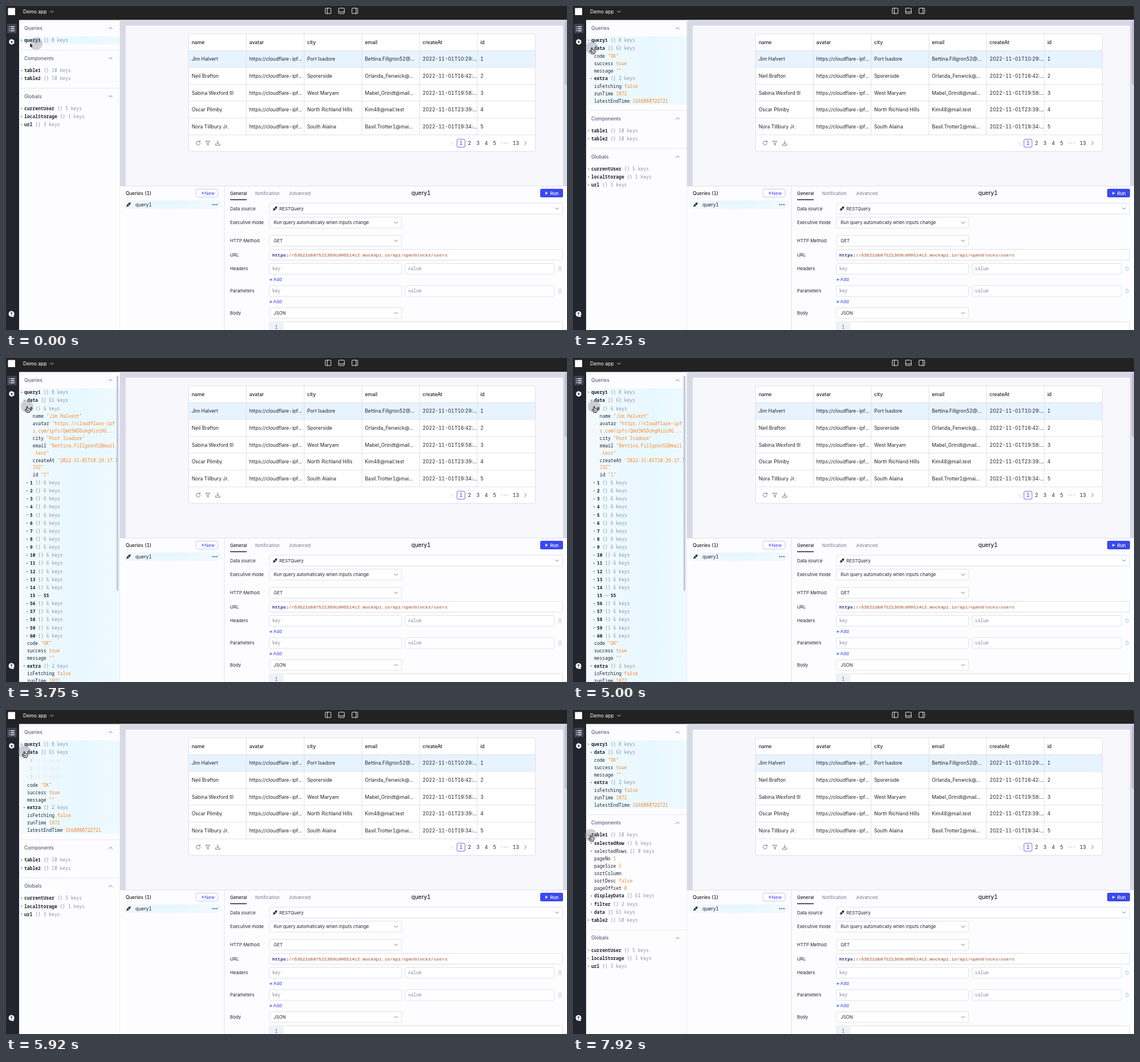
Write an HTML page that moves like this. It is 984 px wide and 569 px high and loops after 8 s.

```html
<!DOCTYPE html>
<html lang="en">
<head>
<meta charset="utf-8">
<title>Query data browser</title>
<style>
  html, body { margin: 0; width: 100%; height: 100%; overflow: hidden; background: #fff; }
  svg { display: block; }
  text { font-family: Inter, sans-serif; font-variant-numeric: tabular-nums; white-space: pre; }
  .mono { font-family: "Noto Sans Mono", "DejaVu Sans Mono", monospace; font-size: 8.02px; }
  .code { font-family: "Liberation Mono", monospace; font-size: 8px; }
</style>
</head>
<body>
<svg id="stage" width="984" height="569" viewBox="0 0 984 569"></svg>
<script>
const LOOP = 8000, STEP = 1000 / 12;
const INK = '#222230', MUTED = '#8b8fa5', BLUE = '#3b49f0', EDGE = '#d6d8e8', VALUE = '#fb8426';
const stage = document.getElementById('stage');

// ---------- drawing helpers ----------
const rect = (x, y, w, h, fill, extra = '') =>
  `<rect x="${x}" y="${y}" width="${w}" height="${h}" fill="${fill}" ${extra}/>`;
const box = (x, y, w, h, stroke = EDGE, fill = '#fff', r = 2) =>
  rect(x, y, w, h, fill, `rx="${r}" stroke="${stroke}" stroke-width=".8"`);
const path = (d, stroke = INK, w = 1, fill = 'none') =>
  `<path d="${d}" stroke="${stroke}" stroke-width="${w}" fill="${fill}" stroke-linecap="round" stroke-linejoin="round"/>`;
const text = (x, cy, s, { size = 7.9, fill = INK, weight = 400, anchor = 'start', cls = '' } = {}) =>
  `<text x="${x}" y="${cy + size * .36}" font-size="${size}" fill="${fill}" font-weight="${weight}" text-anchor="${anchor}" class="${cls}">${s}</text>`;
const chevron = (x, y, up, color = '#6d7088') => {
  const k = up ? -1 : 1;
  return path(`M${x - 2.8} ${y - 1.4 * k}l2.8 ${2.8 * k} 2.8 ${-2.8 * k}`, color);
};
const dots = (x, y, gap, r, color) =>
  [-1, 0, 1].map(i => `<circle cx="${x + i * gap}" cy="${y}" r="${r}" fill="${color}"/>`).join('');
const plug = (x, y) => `<g transform="translate(${x} ${y}) rotate(45)">` +
  rect(-1.9, -3.6, 3.8, 3.2, INK, 'rx="1"') + rect(-1.9, .3, 3.8, 3, INK, 'rx="1"') +
  path('M0 -5V-3M0 3V5') + '</g>';
const trash = (x, y) => path(`M${x - 3} ${y - 2.4}h6M${x - 2.4} ${y - 2}v5h4.8v-5M${x - 1} ${y - 3.4}h2M${x - 1} ${y + .5}h2`, '#c3c5d4', .8);
const gradient = (id, ...stops) => `<linearGradient id="${id}">` +
  stops.map((c, i) => `<stop offset="${i / (stops.length - 1)}" stop-color="${c}"/>`).join('') + '</linearGradient>';

// ---------- fixed parts ----------
function frame() {
  let s = rect(0, 0, 984, 569, '#fdfdff') + rect(0, 0, 23, 569, '#23252e') + rect(0, 0, 984, 24.5, '#222222');
  s += rect(3.5, 3.5, 12.5, 12.5, '#fff');
  s += text(30, 9.8, 'Demo app', { size: 8.6, fill: '#fff' }) + chevron(80.5, 10, false, '#ddd');
  ['M563.6 3.8v9.4', 'M583.6 10.2h10', 'M613.9 3.8v9.4'].forEach((d, i) => {
    s += rect(560 + i * 23.4, 3.8, 10, 9.4, 'none', 'rx="1.2" stroke="#e8e8ec"') + path(d, '#e8e8ec');
  });
  s += rect(2, 31.5, 16.5, 16.5, '#40434f', 'rx="2"');
  for (const y of [36.5, 40, 43.5])
    s += path(`M5.8 ${y}h.4M8.6 ${y}h6`, '#fff', 1.3);
  s += path('M10 58.6l4 2.2v4.6l-4 2.2-4-2.2v-4.6z', '#fff', 1, '#fff') + `<circle cx="10" cy="63.1" r="1.7" fill="#23252e"/>`;
  s += `<circle cx="9.6" cy="540.8" r="5" fill="#fff"/>` + path('M12 543l2 2.6h-4z', '#fff', .6, '#fff');
  s += text(9.6, 540.8, '?', { size: 8, weight: 700, anchor: 'middle', fill: '#23252e' });
  return s;
}

function table() {
  const cols = [320.5, 421.5, 523, 624.3, 725.5, 826.7];
  const rows = [
    ['name', 'avatar', 'city', 'email', 'createAt', 'id'],
    ['Jim Halvert', '', 'Port Isadore', 'Bettina.Fillgron52@...', '10:29', 1],
    ['Neil Brafton', '', 'Sporerside', 'Orlanda_Fenwick@...', '16:42', 2],
    ['Sabina Wexford III', '', 'West Maryam', 'Mabel_Grindt@mail...', '19:58', 3],
    ['Oscar Plimby', '', 'North Richland Hills', 'Kim48@mail.test', '23:39', 4],
    ['Nora Tillbury Jr.', '', 'South Alaina', 'Basil.Trotter1@mai...', '19:34', 5]
  ];
  let s = rect(200, 24.5, 784, 291.5, '#d9d9e6') + rect(210, 34.5, 767, 281.5, '#f7f7fc');
  s += rect(980, 27, 4, 111, '#bfc0cf', 'rx="1.5"');
  s += box(320.5, 49, 608, 206.3, '#d8d9ea') + rect(321, 78.5, 607, 29, '#e7f4fe');
  rows.forEach((row, r) => {
    const y = 63.8 + r * 29.56;
    s += path(`M320.5 ${y + 14.7}H928.5`, '#d8d9ea', .8);
    row.forEach((cell, c) => {
      if (r && c === 1) cell = 'https://cloudflare-ipf...';
      if (r && c === 4) cell = `2022-11-01T${cell}:...`;
      s += text(cols[c] + 5.2, y, cell, { size: 8.6, weight: r ? 400 : 500 });
    });
  });
  for (const x of cols.slice(1)) s += path(`M${x} 49V226`, '#d8d9ea', .8);
  const grey = '#686b82';
  s += path('M340 238.6a3.6 3.6 0 1 0 .6 2.6M340.4 236.6v2.2h-2.2', grey, .9);
  s += path('M350.4 237.4h7.2l-2.7 3.6v3.4l-1.8-1v-2.4z', grey, .9);
  s += path('M371.3 236.8v5M369.2 240l2.1 2.1 2.1-2.1M367.6 242v2.5h7.4v-2.5', grey, .9);
  s += path('M784.6 237.8l-3 3 3 3', '#c5c7d4', .9) + path('M909.6 237.8l3 3-3 3', grey, 1);
  s += box(791, 234, 14, 14, BLUE);
  [[798, 1], [813, 2], [827.7, 3], [842.3, 4], [857, 5], [894.3, 13]].forEach(([x, n]) => {
    s += text(x, 240.9, n, { size: 8.6, anchor: 'middle', fill: n === 1 ? BLUE : INK, weight: n === 1 ? 500 : 400 });
  });
  return s + dots(874.6, 240.8, 4.2, .9, '#b2b4c3');
}

function editor() {
  let s = rect(200, 316, 784, 253, '#fdfdff') + path('M200 316.3H984M383 316V569', '#dddfeb', .9);
  s += text(210, 328.7, 'Queries (1)', { size: 8.3, weight: 500 });
  s += box(333.3, 321.5, 38.8, 14, '#b4bafb');
  s += path('M343.4 328.6h4M345.4 326.6v4', BLUE, .9) + text(348.6, 328.7, 'New', { fill: BLUE, size: 8.2 });
  s += rect(205, 341.3, 173, 15, 'url(#pick)', 'rx="2"') + plug(215, 348.8);
  s += text(227, 348.8, 'query1', { size: 8.5 }) + dots(366.5, 348.8, 3.5, 1, INK);

  s += text(393, 328.8, 'General', { weight: 500 }) + path('M393.6 340.2H421.6', INK, 1.4);
  s += text(437, 328.8, 'Notification', { fill: '#75778b' }) + text(496.7, 328.8, 'Advanced', { fill: '#75778b' });
  s += text(728, 328.8, 'query1', { size: 9.9, weight: 500, anchor: 'middle' });
  s += rect(937, 321, 40, 15, BLUE, 'rx="2.5"') + path('M946.6 326.5l3.6 2.2-3.6 2.2z', '#fff', .4, '#fff');
  s += text(954.4, 328.7, 'Run', { fill: '#fff', size: 8.2, weight: 500 });

  const select = (cy, label, value, w = 232, dx = 7.5) =>
    text(393, cy, label) + box(462, cy - 9.4, w, 18.8) + text(462 + dx, cy, value) + chevron(452 + w, cy, false);
  s += select(355.7, 'Data source', 'RESTQuery', 514.5, 17.5) + plug(472, 355.7);
  s += select(380.5, 'Executive mode', 'Run query automatically when inputs change');
  s += select(412.4, 'HTTP Method', 'GET') + select(539.3, 'Body', 'JSON');
  s += text(393, 437, 'URL') + box(462, 427.5, 514.5, 18.8);
  s += `<text class="code" x="467" y="439.6" fill="#a2441c"><tspan fill="#2d2a8c" font-weight="700">https:</tspan>//63621db87521369cd06514c2.mockapi.io/api/openblocks/users</text>`;
  [['Headers', 461.6], ['Parameters', 500.5]].forEach(([label, y]) => {
    s += text(393, y, label) + box(462, y - 9.4, 232, 18.8) + box(700, y - 9.4, 262, 18.8) + trash(971.8, y);
    s += text(467, y, 'key', { fill: '#85889c', cls: 'mono' }) + text(705, y, 'value', { fill: '#85889c', cls: 'mono' });
    s += path(`M462.6 ${y + 19}h4M464.6 ${y + 17}v4`, BLUE, .9) + text(468.8, y + 19, 'Add', { fill: BLUE });
  });
  s += box(462, 554.7, 514.5, 30) + rect(462.5, 555.2, 24, 20, '#eff0f8');
  return s + text(471.6, 563.8, '1', { cls: 'mono', fill: '#55576b', size: 8 });
}

// ---------- data tree ----------
const OBJ = 14.15, LEAF = 12.92;
const obj = (key, size, kids, open, type = '{}') => ({ key, meta: ` ${type} ${size} keys`, bold: size > 0, kids, open, h: OBJ });
const leaf = (key, ...lines) => ({ key, lines, h: LEAF * lines.length });

// Each entry: [start, length, target]
const opens = {
  query: [[1060, 200, 1]],
  data: [[2370, 240, 1], [5750, 250, 0]],
  first: [[3450, 250, 1], [5150, 230, 0]],
  table: [[7680, 230, 1]]
};

const person = [
  leaf('name', '"Jim Halvert"'),
  leaf('avatar', '"https://cloudflare-ipf', 's.com/ipfs/Qmd3W5DuhgHirLHG...'),
  leaf('city', '"Port Isadore"'),
  leaf('email', '"Bettina.Fillgron52@mail', '.test"'),
  leaf('createAt', '"2022-11-01T10:29:17.1', '19Z"'),
  leaf('id', '"1"')
];
const items = Array.from({ length: 61 }, (_, i) => i).filter(i => i <= 15 || i > 55).map(i =>
  i === 15 ? { key: '15   55', range: true, bold: true, h: OBJ } : obj(String(i), 6, i ? null : person, 'first'));
const query1 = obj('query1', 8, [
  obj('data', 61, items, 'data', '[]'),
  leaf('code', '"OK"'), leaf('success', 'true'), leaf('message', '""'),
  obj('extra', 2),
  leaf('isFetching', 'false'), leaf('runTime', '1872'), leaf('latestEndTime', '1668080722721')
], 'query');
const table1 = obj('table1', 10, [
  obj('selectedRow', 6), obj('selectedRows', 0, null, null, '[]'),
  leaf('pageNo', '1'), leaf('pageSize', '5'), leaf('sortColumn', ''), leaf('sortDesc', 'false'), leaf('pageOffset', '0'),
  obj('displayData', 61, null, null, '[]'), obj('filter', 2), obj('data', 61, null, null, '[]')
], 'table');
const sections = [
  { title: 'Queries', nodes: [query1] },
  { title: 'Components', nodes: [table1, obj('table2', 10)] },
  { title: 'Globals', nodes: [obj('currentUser', 5), obj('localStorage', 1), obj('url', 3)] }
];

const add = (parent, tag, attrs = {}, html = '') => {
  const el = document.createElementNS('http://www.w3.org/2000/svg', tag);
  for (const k in attrs) el.setAttribute(k, attrs[k]);
  el.innerHTML = html;
  return parent.appendChild(el);
};

function build(node, parent, depth) {
  const x = 32 + depth * 4.95;
  const base = (node.lines ? LEAF : OBJ) / 2 + 2.9;
  let s = `<text class="mono" x="${x}" y="${base}" fill="${INK}"><tspan font-weight="${node.bold ? 700 : 400}">${node.key}</tspan>`;
  if (node.meta) s += `<tspan fill="${MUTED}">${node.meta}</tspan>`;
  (node.lines || []).forEach((line, i) => {
    s += i ? `<tspan x="${x}" dy="${LEAF}" fill="${VALUE}">${line}</tspan>` : `<tspan fill="${VALUE}"> ${line}</tspan>`;
  });
  s += '</text>';
  if (node.range) s += dots(x + 17, base - 2.9, 2.4, .55, '#55576b');
  node.row = add(parent, 'g', {}, s);
  if (node.meta) node.arrow = add(node.row, 'path', { d: 'M-1 -1.7L1.5 0L-1 1.7Z', fill: MUTED });
  node.arrowX = x - 4.8;
  if (node.kids) {
    node.group = add(parent, 'svg', { x: 0, width: 200 });
    node.kids.forEach(kid => build(kid, node.group, depth + 1));
  }
}

const ease = x => x < .5 ? 4 * x ** 3 : 1 - 4 * (1 - x) ** 3;
const clamp = x => Math.min(1, Math.max(0, x));
const openness = (name, t) => opens[name].reduce((p, [start, len, to]) =>
  p + (to - p) * ease(clamp((t - start) / len)), 0);

function place(node, y, t) {
  node.row.setAttribute('transform', `translate(0 ${y})`);
  y += node.h;
  const p = node.kids ? openness(node.open, t) : 0;
  if (node.arrow) node.arrow.setAttribute('transform', `translate(${node.arrowX} ${OBJ / 2}) rotate(${p * 90})`);
  if (!node.kids) return y;
  const full = node.kids.reduce((ky, kid) => place(kid, ky, t), 0);
  node.group.setAttribute('y', y);
  node.group.setAttribute('height', full * p);
  node.group.setAttribute('opacity', p);
  node.group.setAttribute('visibility', p ? 'visible' : 'hidden');
  return y + full * p;
}

// ---------- pointer ----------
const track = [
  [0, 42, 65], [170, 42, 65], [800, 29.5, 60], [1330, 29.5, 60], [2170, 33, 73.5], [2750, 33, 73.5], [3400, 37, 85],
  [5420, 37, 85], [5700, 32, 73], [6100, 32, 73], [6840, 29, 182], [7150, 28, 214], [7500, 31, 220], [8000, 31, 220]
];
function pointerAt(t) {
  const i = Math.max(1, track.findIndex(k => k[0] > t));
  const [t0, x0, y0] = track[i - 1], [t1, x1, y1] = track[i];
  const u = clamp((t - t0) / (t1 - t0)), e = u * u * (3 - 2 * u);
  return [x0 + (x1 - x0) * e, y0 + (y1 - y0) * e];
}

// ---------- assembly ----------
stage.innerHTML = '<defs>' + gradient('pick', '#f3f8fd', '#e6f7fe', '#f2fbff') +
  gradient('soft', '#f5fafe', '#ebf9ff', '#e8f8ff', '#eefaff') + '</defs>' + frame();
const side = add(stage, 'svg', { x: 0, y: 0, width: 200, height: 569 });
const mark = add(side, 'rect', { x: 23, y: 53.2, width: 177, fill: 'url(#soft)' });
sections.forEach((sec, i) => {
  sec.head = add(side, 'g', {}, (i ? path('M23 -14.3H200', '#e3e4ef', .9) : '') +
    text(32, 0, sec.title, { size: 8.5, fill: '#5c5f78', weight: 500 }) + chevron(183.5, 0, true));
  sec.nodes.forEach(node => build(node, side, 0));
});
const bar = add(side, 'rect', { x: 193.8, y: 31, width: 3.4, rx: 1.5, fill: '#c6c8d7' });
add(stage, 'g', {}, path('M200 24.5V569', '#dddfeb', .9) + table() + editor());
const halo = add(stage, 'circle', { r: 11, fill: '#77777f', opacity: .32 });
const arrow = add(stage, 'g', {}, path('M0 0v8.2l1.9-1.8 1.4 3 1.5-.7-1.4-2.9h2.7z', '#fff', .7, '#111'));
const hand = add(stage, 'g', {}, path('M-.9 .4q.9-1.2 1.8 0v3.2q1-.7 1.7.2 1-.5 1.6.4 1.2-.2 1.2 1v2.2q-.2 1.2-.8 2v1.2H-.4q-.8-1.6-2.4-3.3-1.3-1.7-.5-2.2.9-.4 2.4 1.2z', '#111', 1, '#e8e8ee') +
  path('M1.2 6.3v2.2M2.7 6.3v2.2M-.1 6.3v2.2', '#111', .6));

function draw(ms) {
  const t = Math.floor((ms % LOOP) / STEP) * STEP;
  let y = 38.9;
  sections.forEach((sec, i) => {
    sec.head.setAttribute('transform', `translate(0 ${y})`);
    y = sec.nodes.reduce((ny, node) => place(node, ny, t), y + 14.35);
    if (!i) {
      mark.setAttribute('height', y - 53.2);
      if (t > 2400) y += .6;
    }
    y += 24.3;
  });
  const content = y + 24;
  bar.setAttribute('height', 544 * 544 / content);
  bar.setAttribute('visibility', content > 544 ? 'visible' : 'hidden');

  const [px, py] = pointerAt(t);
  const lag = 11 * clamp(1 - (t - 160) / 250);
  const pointing = t > 700 && !(t > 6180 && t < 7150);
  halo.setAttribute('cx', px + lag);
  halo.setAttribute('cy', py + lag * .1);
  for (const el of [arrow, hand]) el.setAttribute('transform', `translate(${px} ${py})`);
  arrow.setAttribute('visibility', pointing ? 'hidden' : 'visible');
  hand.setAttribute('visibility', pointing ? 'visible' : 'hidden');
}

const began = performance.now();
(function tick() {
  draw(performance.now() - began);
  requestAnimationFrame(tick);
})();
</script>
</body>
</html>
```
